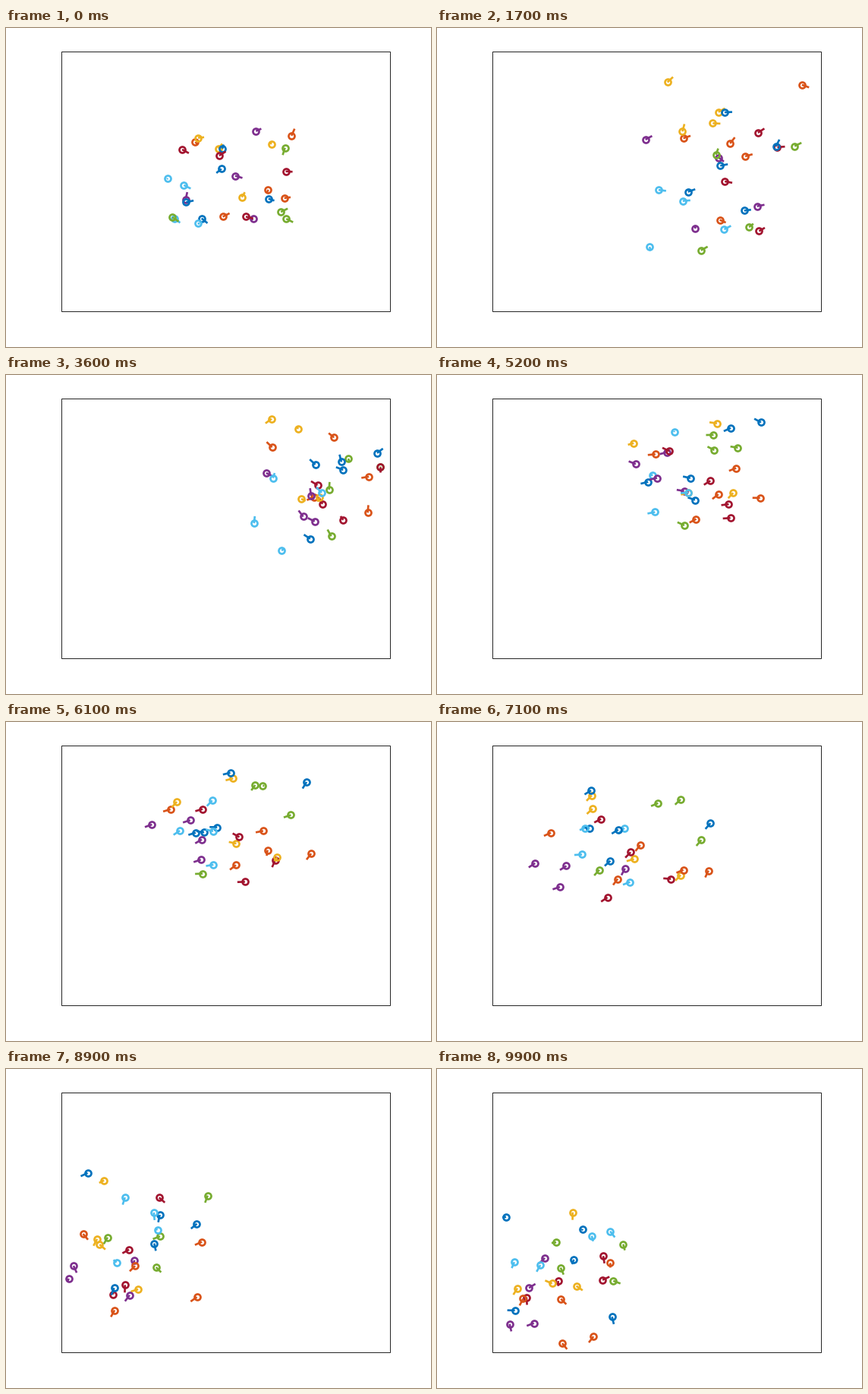
Recreate the animation shown at these times as a matplotlib script. Size 560x420 px, loop 10 s.

```python
import numpy as np
import matplotlib.pyplot as plt
from matplotlib.animation import FuncAnimation
from matplotlib.patches import Rectangle

W, H, DPI = 560, 420, 100
FRAMES, INTERVAL = 100, 100
BIRDS = 30
ARROW_GAIN, MAX_ARROW = 3, 10
PX = 72 / DPI  # points per pixel
COLORS = ["#0072BD", "#D95319", "#EDB120", "#7E2F8E",
          "#77AC30", "#4DBEEE", "#A2142F"]

# time, flock centre (x, y) and spread (x, y)
DRIFT = np.array([(0, 295, 203, 52, 40),
                  (17, 374, 185, 56, 62),
                  (36, 415, 146, 48, 46),
                  (52, 341, 129, 47, 40),
                  (71, 243, 164, 64, 39),
                  (89, 168, 232, 50, 50),
                  (99, 165, 270, 47, 48)], float)


def normalise(p):
    return (p - p.mean(axis=0)) / p.std(axis=0)


def build_poses(rng):
    """Wandering offsets around the drifting centre, one pose per key time."""
    u = normalise(rng.uniform(-1, 1, (BIRDS, 2)))
    poses = []
    for row in DRIFT:
        poses.append(row[1:3] + row[3:] * np.clip(u, -1.8, 1.8))
        u = normalise(0.7 * u + 0.7 * rng.uniform(-1.7, 1.7, u.shape))
    return np.array(poses)


def hermite(times, poses, t):
    slopes = np.gradient(poses, times, axis=0)
    slopes[[0, -1]] *= 0.4  # ease out of the first pose and into the last
    k = np.clip(np.searchsorted(times, t, side="right") - 1, 0, len(times) - 2)
    h = times[k + 1] - times[k]
    s = (t - times[k]) / h
    return ((1 + 2 * s) * (1 - s) ** 2 * poses[k]
            + s * (1 - s) ** 2 * h * slopes[k]
            + s ** 2 * (3 - 2 * s) * poses[k + 1]
            + s ** 2 * (s - 1) * h * slopes[k + 1])


def build_track(rng):
    poses = build_poses(rng)
    track = np.array([hermite(DRIFT[:, 0], poses, t) for t in range(FRAMES)])
    steps = np.arange(FRAMES)[:, None, None]
    for _ in range(2):
        amp, rate, phase = rng.uniform([[[2]], [[0.25]], [[0]]],
                                       [[[5]], [[0.6]], [[2 * np.pi]]],
                                       (3, BIRDS, 2))
        track += amp * np.sin(rate * steps + phase)
    return np.clip(track, (82, 40), (492, 362))


def build_arrows(track):
    v = ARROW_GAIN * np.gradient(track, axis=0)
    speed = np.maximum(np.hypot(v[..., 0], v[..., 1]), 1e-6)
    return v * np.minimum(1, MAX_ARROW / speed)[..., None]


track = build_track(np.random.default_rng(12))
tips = track + build_arrows(track)

fig = plt.figure(figsize=(W / DPI, H / DPI), dpi=DPI, facecolor="white")
ax = fig.add_axes([0, 0, 1, 1])
ax.set_xlim(-0.5, W - 0.5)
ax.set_ylim(H - 0.5, -0.5)
ax.axis("off")
ax.add_patch(Rectangle((72.8, 30.8), 433, 342, fill=False,
                       ec="#262626", lw=PX, snap=True))

birds = [ax.plot([], [], color=COLORS[i % len(COLORS)],
                 lw=2.67 * PX, solid_capstyle="butt", marker="o", markevery=[0],
                 ms=8 * PX, mew=2.67 * PX, mfc="none")[0]
         for i in range(BIRDS)]


def draw(i):
    for bird, p, q in zip(birds, track[i], tips[i]):
        bird.set_data([p[0], q[0]], [p[1], q[1]])
    return birds


anim = FuncAnimation(fig, draw, frames=FRAMES, interval=INTERVAL,
                     repeat=True, repeat_delay=0)
plt.show()
```
